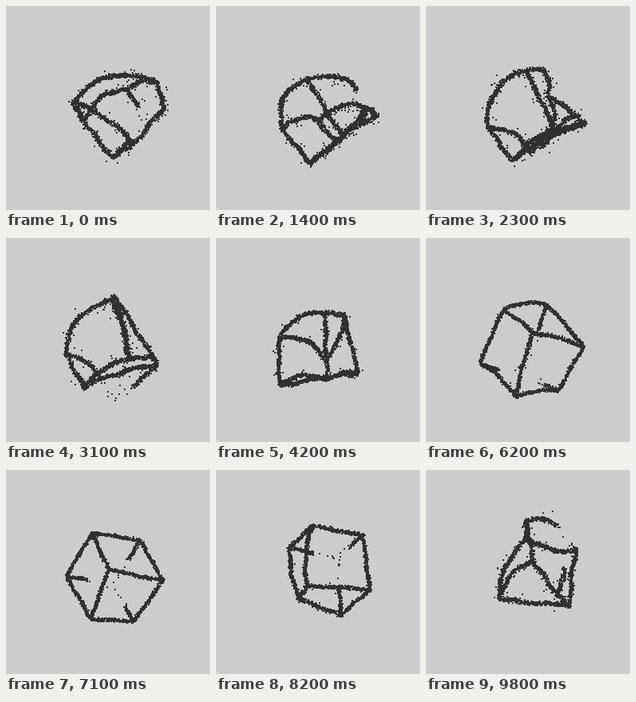
An HTML page with a canvas that plays this animation: 256 by 256 pixels, repeating every 10000 ms.

```html
<!DOCTYPE html>
<html>
<head>
<meta charset="utf-8">
<style>
html, body { margin: 0; width: 100%; height: 100%; overflow: hidden; background: #ccc; }
canvas { display: block; width: 100vmin; height: 100vmin; image-rendering: pixelated; }
</style>
</head>
<body>
<canvas id="stage" width="256" height="256"></canvas>
<script>
const ctx = document.getElementById('stage').getContext('2d');

// Cube corners are numbered 0-7 by axis bits; an edge joins corners differing in one bit.
const edges = [];
for (let v = 0; v < 8; v++)
  for (const bit of [1, 2, 4]) if (!(v & bit)) edges.push([v, v | bit]);

const poses = [];

// step, roughness, the far corner and how strongly it fades, corner points, edge bends in px
function pose(step, rough, far, fade, points, bends = {}) {
  const bend = edges.map(([a, b]) => bends['e' + a + b] || 0);
  const fades = Array.from({ length: 8 }, (_, i) => i === far ? fade : 0);
  poses.push({ step, values: [...points, ...bend, ...fades, rough] });
}

pose(0, 1, 7, 1, [85,121, 98,146, 190,96, 152,104, 160,174, 133,190, 198,128, 178,150],
  { e04: -7, e02: -21, e13: -11, e23: 5 });
pose(13, 1.1, 2, .77, [113,92, 84,155, 178,150, 129,144, 160,164, 118,198, 190,128, 202,138],
  { e01: 15, e02: -33, e23: -20, e13: -9, e37: -17, e57: -4 });
pose(29, 1, 3, .9, [132,78, 75,145, 136,74, 136,206, 155,152, 98,188, 184,148, 189,161],
  { e01: 16, e04: -4, e13: -11, e23: -14, e45: 7, e57: -6 });
pose(49, .6, 7, 1.3, [136,113, 88,104, 192,130, 139,92, 123,203, 67,176, 172,188, 128,168],
  { e01: 4, e02: -4, e04: 3, e13: -11, e15: 2, e45: 7, e46: -7, e57: 10, e67: -7 });
pose(65, .4, 7, 1.15, [129,125, 108,79, 197,139, 168,88, 106,187, 76,133, 160,190, 134,145]);
pose(75, .6, 7, 1, [115,145, 122,70, 193,150, 184,82, 104,162, 92,97, 157,182, 152,111],
  { e01: -6, e45: -3 });
pose(90, 1, 7, .9, [92,162, 126,86, 180,171, 189,101, 134,114, 126,64, 165,157, 182,95],
  { e01: -9, e04: -8, e13: 6, e23: -2, e57: -15 });

function slope(k, i) {
  const a = poses[Math.max(0, k - 1)], b = poses[Math.min(poses.length - 1, k + 1)];
  return (b.values[i] - a.values[i]) / (b.step - a.step);
}

// Hermite curve through the poses
function poseAt(step) {
  let k = 0;
  while (k < poses.length - 2 && poses[k + 1].step <= step) k++;
  const p = poses[k], q = poses[k + 1], span = q.step - p.step;
  const u = (step - p.step) / span, w = 1 - u;
  return p.values.map((a, i) =>
    a * w * w * (1 + 2 * u) + q.values[i] * u * u * (3 - 2 * u) +
    span * u * w * (slope(k, i) * w - slope(k + 1, i) * u));
}

function seeded(seed) {
  return () => {
    seed = seed + 0x6D2B79F5 | 0;
    let h = Math.imul(seed ^ seed >>> 15, 1 | seed);
    h = h + Math.imul(h ^ h >>> 7, 61 | h) ^ h;
    return ((h ^ h >>> 14) >>> 0) / 4294967296;
  };
}

function draw(step) {
  const values = poseAt(step), rnd = seeded(step * 977 + 5);
  const rough = values[36], fade = v => values[28 + v];
  const spread = size => (rnd() + rnd() - 1) * size;
  ctx.fillStyle = '#ccc';
  ctx.fillRect(0, 0, 256, 256);
  ctx.fillStyle = '#303030';
  edges.forEach(([a, b], e) => {
    const x = values[2 * a], y = values[2 * a + 1];
    const dx = values[2 * b] - x, dy = values[2 * b + 1] - y;
    const len = Math.hypot(dx, dy) || 1, bend = values[16 + e];
    const count = 20 + (len + Math.abs(bend)) * 4;
    for (let i = 0; i < count; i++) {
      const s = rnd(), far = fade(a) * (1 - s) + fade(b) * s > .5;
      if (far && rnd() > .035) continue;
      const arch = 4 * s * (1 - s);
      const off = arch * (bend + rough * 1.3 * Math.sin(s * 9 + e * 2 + step * .3));
      const size = rnd() < .04 * rough ? 11 * rough : far ? 6 : 2.2 + rough * 1.2;
      const px = x + dx * s - dy / len * off + spread(size);
      const py = y + dy * s + dx / len * off + spread(size);
      ctx.fillRect(Math.round(px - 1), Math.round(py - 1), 2, 2);
    }
  });
}

// Ten steps of 100 ms, each run ending in a 100 ms rest
function stepAt(ms) {
  if (ms < 100) return 0;
  const t = ms - 100;
  return 10 * Math.floor(t / 1100) + Math.min(9, Math.floor(t % 1100 / 100)) + 1;
}

const start = performance.now();
let shown = -1;
function tick() {
  const step = stepAt((performance.now() - start) % 10000);
  if (step !== shown) draw(shown = step);
  requestAnimationFrame(tick);
}
tick();
</script>
</body>
</html>
```
